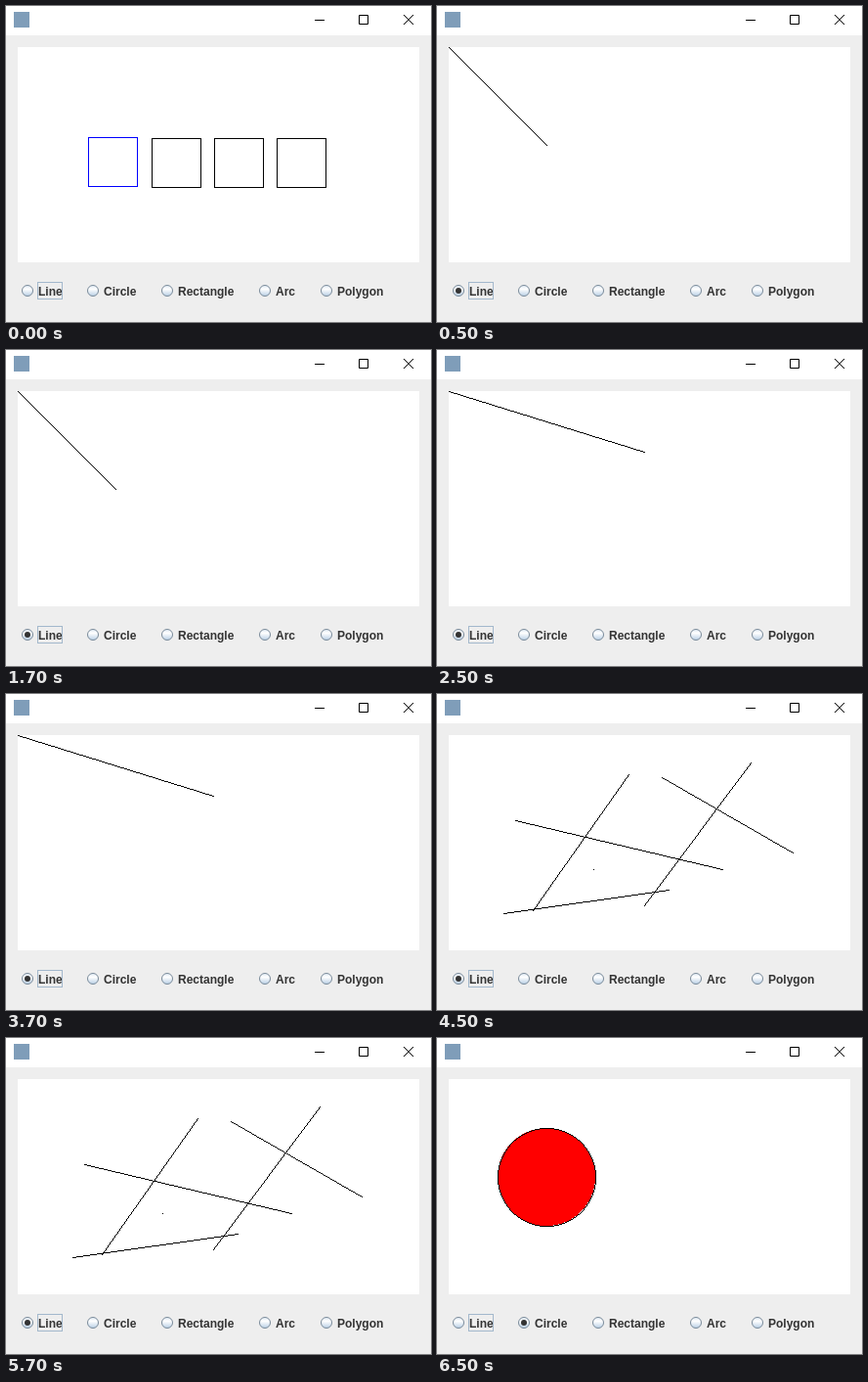
Animation of 435 by 323 pixels, one loop 8 s. Source, as an HTML page with a canvas:

```html
<!DOCTYPE html>
<html lang="en">
<head>
<meta charset="utf-8">
<title>Shape drawing window</title>
<style>
  html, body { margin: 0; width: 100%; height: 100%; overflow: hidden; background: #eee; }
  svg, canvas { position: absolute; left: 0; top: 0; display: block; }
  canvas { left: 12px; top: 42px; }
  text { font: bold 12px "Liberation Sans", Arial, sans-serif; fill: #333; }
</style>
</head>
<body>
<svg width="435" height="323">
  <defs>
    <linearGradient id="shine" x2="0" y2="1">
      <stop offset="0" stop-color="#dde8f3"/>
      <stop offset=".35" stop-color="#fff"/>
      <stop offset="1" stop-color="#b8cfe5"/>
    </linearGradient>
  </defs>
  <rect width="435" height="30" fill="#fff"/>
  <rect x="8" y="6" width="16" height="16" fill="#7f9db9"/>
  <path d="M316 14.5h10M361.5 9.5h9v9h-9zM407 9l10 10M417 9l-10 10" fill="none" stroke="#000"/>
  <g id="radios"></g>
  <rect x="32.5" y="282.5" width="25" height="17" fill="none" stroke="#a3b8cc"/>
  <circle id="dot" cy="291" r="3" fill="#333"/>
</svg>
<canvas id="panel" width="411" height="220"></canvas>
<script>
const radios = [["Line", 22], ["Circle", 89], ["Rectangle", 165], ["Arc", 265], ["Polygon", 328]];
document.getElementById("radios").innerHTML = radios.map(([name, x]) =>
  `<circle cx="${x}" cy="291" r="5.5" fill="url(#shine)" stroke="#7a8a99"/>
   <text x="${x + 11}" y="296">${name}</text>`).join("");

const dot = document.getElementById("dot");
const ctx = document.getElementById("panel").getContext("2d");
ctx.translate(-12, -42); // draw in window coordinates

const plot = (x, y) => ctx.fillRect(x, y, 1, 1);

// One-pixel line without antialiasing
function line(x1, y1, x2, y2) {
  const n = Math.max(Math.abs(x2 - x1), Math.abs(y2 - y1)) || 1;
  for (let i = 0; i <= n; i++)
    plot(Math.round(x1 + (x2 - x1) * i / n), Math.round(y1 + (y2 - y1) * i / n));
}

function square(x, y, color) {
  ctx.strokeStyle = color;
  ctx.strokeRect(x + .5, y + .5, 50, 50);
}

function disc(cx, cy, r) {
  ctx.fillStyle = "#f00";
  for (let y = -r; y < r; y++) {
    const w = Math.round(Math.sqrt(r * r - (y + .5) ** 2));
    ctx.fillRect(cx - w, cy + y, 2 * w, 1);
  }
  ctx.fillStyle = "#000";
  for (let a = 0; a <= r * Math.SQRT1_2 + .5; a++) {
    const b = Math.round(Math.sqrt(r * r - a * a));
    for (const [x, y] of [[a, b], [b, a]])
      for (const sx of [-1, 1])
        for (const sy of [-1, 1]) plot(cx + sx * x, cy + sy * y);
  }
}

function squares() {
  square(84, 134, "#00f");
  for (const x of [149, 213, 277]) square(x, 135, "#000");
}

function scatter() {
  line(196, 82, 98, 221);
  line(80, 129, 292, 179);
  line(230, 85, 364, 162);
  line(321, 70, 212, 216);
  line(68, 224, 237, 200);
  plot(160, 179);
}

// Start time, selected radio, drawing
const scenes = [
  [0, -1, squares],
  [500, 0, () => line(12, 42, 112, 142)],
  [2500, 0, () => line(12, 42, 212, 104)],
  [4500, 0, scatter],
  [6500, 1, () => disc(112, 142, 50)]
];

let shown;
const start = performance.now();
function tick() {
  const t = (performance.now() - start) % 8000;
  const scene = scenes.findLast(s => s[0] <= t);
  if (scene !== shown) {
    shown = scene;
    const [, selected, draw] = scene;
    dot.setAttribute("cx", selected < 0 ? -9 : radios[selected][1]);
    ctx.fillStyle = "#fff";
    ctx.fillRect(12, 42, 411, 220);
    ctx.fillStyle = "#000";
    draw();
  }
  requestAnimationFrame(tick);
}
tick();
</script>
</body>
</html>
```
